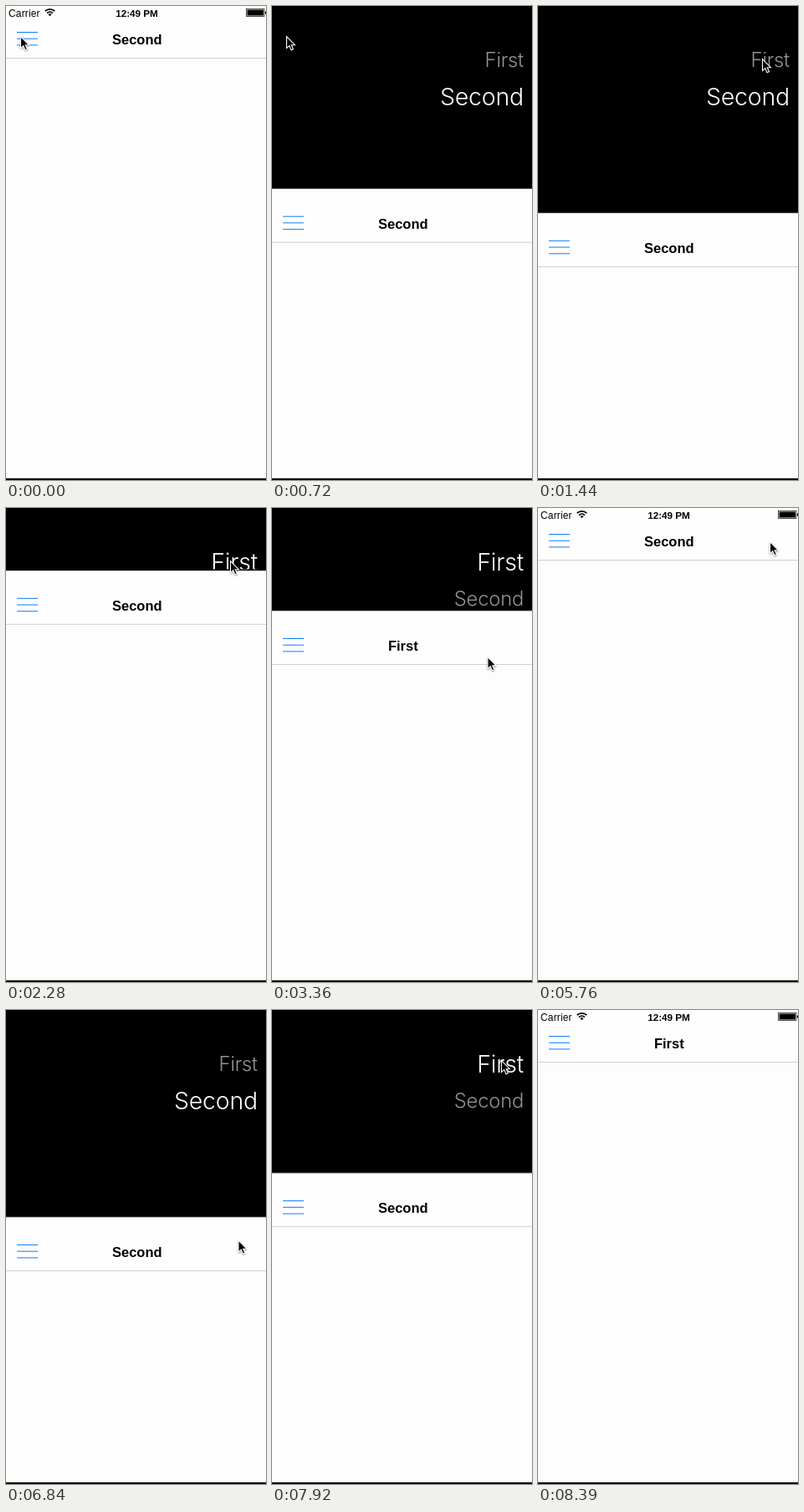
Write an HTML page with a canvas that moves like this. It is 311 px wide and 568 px high and loops after 9.12 s.

```html
<!DOCTYPE html>
<html lang="en">
<head>
<meta charset="utf-8">
<title>Pull-down menu</title>
<style>
  html, body { margin: 0; width: 100%; height: 100%; overflow: hidden; background: #000; }
  canvas { display: block; }
</style>
</head>
<body>
<canvas id="stage" width="311" height="568"></canvas>
<script>
const W = 311, H = 568, LOOP = 9120, STEP = 120, LAST = 8390, OPEN = 250;
const ctx = document.getElementById('stage').getContext('2d');
const SANS = '"Liberation Sans", Arial, sans-serif';
const THIN = 'Inter, Roboto, sans-serif';
const ITEMS = ['First', 'Second'];

const clamp = u => Math.min(1, Math.max(0, u));
const smooth = u => { u = clamp(u); return u * u * (3 - 2 * u); };

// Panel offset, by ms since each action began
const NUDGE = 160, SNAP = 187.5;
const spring = ms => {
  const x = 0.0075 * ms;
  return OPEN * (1 - Math.exp(-1.09 * x) * (Math.cos(x) + 1.09 * Math.sin(x)));
};
const drag = span => ms => OPEN * smooth(ms / span);
const shut = ms => (OPEN + 10 * smooth(ms / NUDGE)) * (1 - smooth((ms - NUDGE) / SNAP));

const actions = [
  { at: 480, move: spring },
  { at: 2000, move: shut, pick: 0 },
  { at: 3000, move: drag(720) },
  { at: 5000, move: shut, pick: 1 },
  { at: 6480, move: drag(360) },
  { at: 7700, move: shut, pick: 0 }
];

// Pointer legs: start, duration, x, y of the tip at the end
const legs = [
  [1080, 360, 268, 63],
  [2400, 360, 257, 53],
  [3000, 360, 257.5, 178],
  [3360, 600, 287.5, 278],
  [4080, 360, 251, 120],
  [5400, 360, 277, 40],
  [6480, 360, 277.5, 275.5],
  [6840, 360, 274, 50],
  [7320, 120, 274, 60],
  [8040, 350, 325, 280]
];

function offset(t) {
  const now = actions.filter(a => a.at <= t).pop();
  return now ? now.move(t - now.at) : 0;
}

function picked(t) {
  const last = actions.filter(a => 'pick' in a && a.at <= t).pop();
  return last ? last.pick : 1;
}

function tip(t) {
  let x = 17, y = 36;
  for (const [at, span, toX, toY] of legs) {
    const u = smooth((t - at) / span);
    x += (toX - x) * u;
    y += (toY - y) * u;
  }
  return [x, y];
}

function rect(color, x, y, w, h) {
  ctx.fillStyle = color;
  ctx.fillRect(x, y, w, h);
}

function text(str, x, y, font, color, align, spacing = 0) {
  ctx.font = font;
  ctx.fillStyle = color;
  ctx.textAlign = align;
  ctx.letterSpacing = spacing + 'px';
  ctx.fillText(str, x, y);
}

function menu(choice) {
  ITEMS.forEach((name, i) => {
    const [size, drop, color] = i === choice ? [28.5, 10.3, '#fff'] : [23.75, 7.8, '#959595'];
    text(name, 301, 65 + 44 * i + drop, `300 ${size}px ${THIN}`, color, 'right', -0.2);
  });
}

function panel(y, title) {
  ctx.save();
  ctx.translate(0, y);
  rect('#141414', 0, -3.5, W, 2);
  rect('#fdfdfd', 0, -1.5, W, H);
  rect('#fefefe', 0, -1.5, W, 63.5);
  rect('#cfcfcf', 0, 62, W, 1);
  for (let i = 0; i < 3; i++) rect('#0a7cff', 13, 31 + 7.7 * i, 25, 1);
  text(ITEMS[title], 156.8, 46, `bold 16.5px ${SANS}`, '#000', 'center');
  ctx.restore();
}

// Black on black while the menu is open, so it only shows over the panel
function statusBar() {
  text('Carrier', 3, 12.5, `12px ${SANS}`, '#000', 'left', 0.15);
  text('12:49 PM', 156.5, 12.5, `bold 11.7px ${SANS}`, '#000', 'center');
  ctx.strokeStyle = '#000';
  ctx.lineWidth = 1.8;
  for (const r of [4.8, 8.2]) {
    ctx.beginPath();
    ctx.arc(52.5, 12, r, -Math.PI * 0.75, -Math.PI * 0.25);
    ctx.stroke();
  }
  ctx.beginPath();
  ctx.moveTo(52.5, 12.3);
  ctx.arc(52.5, 12, 2.8, -Math.PI * 0.75, -Math.PI * 0.25);
  ctx.fill();
  ctx.lineWidth = 0.7;
  ctx.strokeRect(287.5, 3.5, 21.5, 9);
  rect('#000', 288.5, 4.5, 19.5, 7);
  rect('#000', 309.8, 6.5, 1.2, 3);
}

const arrow = new Path2D('M0.5 0.5V14.6L3.7 11.6L6 16.8L8.4 15.8L6.2 10.7H10.4Z');

function pointer(x, y) {
  ctx.save();
  ctx.translate(x, y);
  ctx.fillStyle = '#000';
  ctx.strokeStyle = '#fff';
  ctx.lineWidth = 1.1;
  ctx.shadowColor = 'rgba(0,0,0,.35)';
  ctx.shadowBlur = 2;
  ctx.shadowOffsetY = 1;
  ctx.fill(arrow);
  ctx.stroke(arrow);
  ctx.restore();
}

function draw(now) {
  const ms = now % LOOP;
  const t = ms >= LAST ? LAST : Math.floor(ms / STEP) * STEP;
  rect('#000', 0, 0, W, H);
  menu(picked(t));
  // The title follows the choice once the panel has shut
  panel(offset(t), picked(t - NUDGE - SNAP));
  statusBar();
  rect('#000', 0, 566, W, 2);
  pointer(...tip(t));
}

const start = performance.now();
function loop() {
  draw(performance.now() - start);
  requestAnimationFrame(loop);
}
loop();
</script>
</body>
</html>
```
